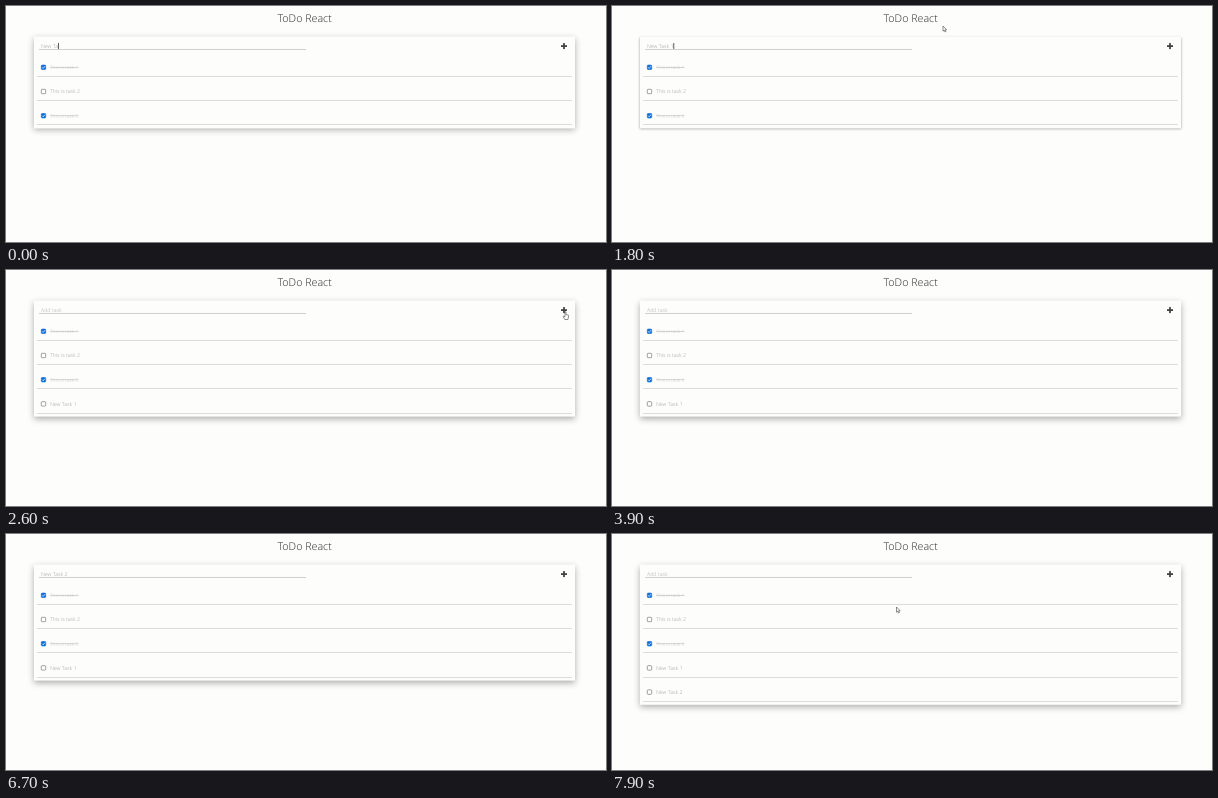
Animation, 600 px wide and 236 px high, one loop 8 s. Source, as an HTML page with a canvas:

```html
<!DOCTYPE html>
<html lang="en">
<head>
<meta charset="utf-8">
<title>ToDo React</title>
<style>
html, body { margin: 0; height: 100%; overflow: hidden; background: #fdfefc; }
canvas { display: block; width: 600px; height: 236px; }
</style>
</head>
<body>
<canvas></canvas>
<script>
const LOOP = 8000;
const canvas = document.querySelector('canvas');
const ctx = canvas.getContext('2d');
const ratio = window.devicePixelRatio || 1;
canvas.width = 600 * ratio;
canvas.height = 236 * ratio;
ctx.scale(ratio, ratio);
ctx.textRendering = 'geometricPrecision';

// [time, field text]
const typing = [
  [0, 'New Ta'], [200, 'New Tas'], [300, 'New Task'], [400, 'New Task '], [600, 'New Task 1'],
  [2500, ''], [4100, 'N'], [4400, 'Ne'], [4500, 'New'], [4600, 'New '], [5200, 'New T'],
  [5400, 'New Ta'], [5600, 'New Tas'], [5700, 'New Task'], [5900, 'New Task '],
  [6000, 'New Task 2'], [7500, '']
];
// [from, to] times when the caret is hidden
const caretOff = [[1100, 1600], [2300, 3400], [3900, 4100], [5100, 5200], [6500, 7000], [7200, 8000]];
// [time, x, y] of the pointer tip, one list per visible trip
const trips = [
  [[1700, 326, 30], [1800, 331, 20], [1900, 352, 22], [2100, 462, 31], [2300, 552, 40], [2400, 559.5, 41.5], [2700, 559.5, 41.5], [3000, 320, 44]],
  [[6800, 305, 44], [7100, 455, 43], [7300, 552, 40], [7400, 557.5, 39], [7700, 557.5, 39], [7800, 440, 55], [7900, 284.5, 73], [8000, 284.5, 73]]
];
const hoverKeys = [[0, 1], [1550, 1], [1750, 0], [2000, 0], [2300, 1], [8000, 1]];

const tasks = [
  { text: 'This is task 1', done: true, from: 0 },
  { text: 'This is task 2', from: 0 },
  { text: 'This is task 3', done: true, from: 0 },
  { text: 'New Task 1', from: 2500 },
  { text: 'New Task 2', from: 7500 }
];

function sample(keys, t) {
  const i = keys.findIndex((k, n) => n && t <= k[0]);
  if (i < 0 || t < keys[0][0]) return null;
  const a = keys[i - 1], b = keys[i], p = (t - a[0]) / (b[0] - a[0]);
  return a.slice(1).map((v, n) => v + (b[n + 1] - v) * p);
}

function rect(x, y, w, h, color) {
  ctx.fillStyle = color;
  ctx.fillRect(x, y, w, h);
}

function text(str, x, y, size, color) {
  ctx.font = `300 ${size}px "Open Sans", "Noto Sans", sans-serif`;
  ctx.fillStyle = color;
  ctx.fillText(str, x, y);
  return ctx.measureText(str).width;
}

function card(count, hover) {
  ctx.save();
  ctx.shadowColor = `rgba(0,0,0,${0.42 - 0.1 * hover})`;
  ctx.shadowBlur = (2.5 + 4 * hover) * ratio;
  ctx.shadowOffsetY = (1 + hover) * ratio;
  rect(28, 30.5, 541, 19.3 + 24.2 * count, '#fdfefc');
  ctx.restore();
}

function task({ text: label, done }, i) {
  const y = 61.3 + 24.2 * i;
  ctx.beginPath();
  ctx.roundRect(35.3, y - 2.2, 4.4, 4.4, 0.8);
  ctx.fillStyle = done ? '#1270d8' : '#fff';
  ctx.strokeStyle = done ? '#1270d8' : '#777';
  ctx.lineWidth = 0.7;
  ctx.fill();
  ctx.stroke();
  if (done) {
    ctx.strokeStyle = '#fff';
    ctx.stroke(new Path2D(`M36.2 ${y} l1 1.1 l1.8 -2.2`));
  }
  const w = text(label, 44, y + 1.9, done ? 5 : 5.3, done ? '#ccc' : '#999');
  if (done) rect(44, y - 0.2, w, 0.6, '#b8b8b8');
  rect(31, Math.round(y + 8.7), 535, 1, '#dcdddb');
}

const arrow = new Path2D('M0 0 V5.2 L1.2 4.1 L2 6 L2.9 5.6 L2.1 3.8 H3.7 Z');
const hand = new Path2D('M-.5 .5 Q0 -.3 .5 .5 V3 L2.8 3.6 Q3.3 4 3 5.5 L2.4 8 H-.7 L-2.4 5 Q-2 4.2 -.5 5.3 Z');

function pointer(x, y) {
  ctx.save();
  ctx.translate(x, y);
  ctx.fillStyle = '#fff';
  ctx.strokeStyle = '#444';
  ctx.lineWidth = 0.6;
  const shape = x > 554 ? hand : arrow;
  ctx.fill(shape);
  ctx.stroke(shape);
  ctx.restore();
}

function draw(t) {
  rect(0, 0, 600, 236, '#fdfefc');
  text('ToDo React', 271.5, 15.8, 10.7, '#222');

  const shown = tasks.filter(k => t >= k.from);
  card(shown.length, sample(hoverKeys, t)[0]);

  const value = typing.filter(k => t >= k[0]).pop()[1];
  const w = text(value || 'Add task', 35, 41.7, 5.3, value ? '#999' : '#aaa');
  rect(33, 43, 267, 1, '#d0d1cf');
  if (!caretOff.some(([a, b]) => t >= a && t < b)) {
    rect(value ? 35 + w : 34.6, 37, 0.8, 6, '#333');
  }

  rect(555, 39.2, 6, 1.8, '#444');
  rect(557.1, 37.1, 1.8, 6, '#444');
  shown.forEach(task);

  for (const trip of trips) {
    const at = sample(trip, t);
    if (at) pointer(...at);
  }
}

function frame(now) {
  draw(Math.floor(now % LOOP / 100) * 100);
  requestAnimationFrame(frame);
}
requestAnimationFrame(frame);
</script>
</body>
</html>
```
